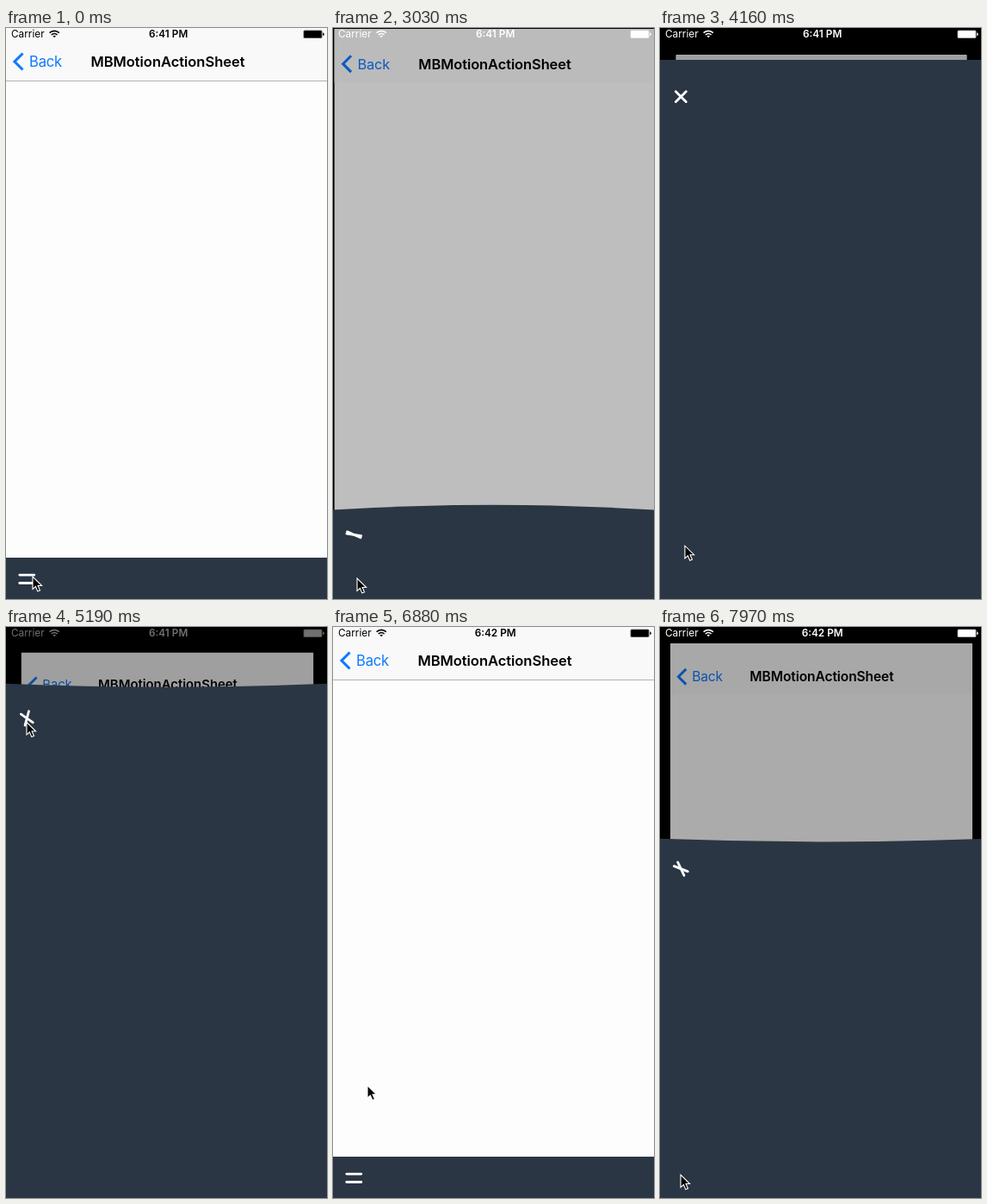
An HTML page for the animation above (8 s loop, 373 by 663 pixels).

```html
<!DOCTYPE html>
<html lang="en">
<head>
<meta charset="utf-8">
<title>Motion action sheet</title>
<style>
html, body { margin: 0; width: 100%; height: 100%; overflow: hidden; background: #000; }
svg { display: block; width: 373px; height: 663px; font-family: Inter, Roboto, sans-serif; }
.title { font-size: 16.6px; font-weight: 600; letter-spacing: -.08px; text-anchor: middle; }
.back { font-size: 16.6px; letter-spacing: -.2px; fill: #0f7aff; }
.chevron { fill: none; stroke: #0f7aff; stroke-width: 3.1; }
.status { font-size: 11.8px; }
.clock { font-weight: 600; text-anchor: middle; }
.icon { stroke: #fff; stroke-width: 2.8; stroke-linecap: round; }
</style>
</head>
<body>
<svg viewBox="0 0 373 663">
  <rect width="373" height="663"/>
  <g id="page">
    <rect y="-2" width="375" height="667" fill="#fdfdfd"/>
    <rect y="-2" width="375" height="63" fill="#f9f9f9"/>
    <rect id="hairline" y="61" width="375" height="1" fill="#b0b1b2"/>
    <path class="chevron" d="M19.5 29.5 10 39 19.5 48.5"/>
    <text class="back" x="27" y="45">Back</text>
    <text class="title" x="188" y="45">MBMotionActionSheet</text>
    <rect id="dim" y="-2" width="375" height="667"/>
  </g>
  <g id="status" class="status">
    <text x="6" y="11.3">Carrier</text>
    <text id="clock" class="clock" x="188.7" y="11.3">6:41 PM</text>
    <g id="wifi" fill="none" stroke-width="1.7">
      <path d="M50.6 5.6a8 8 0 0 1 11.2 0M52.8 8a5 5 0 0 1 6.8 0"/>
      <path d="M54.4 9.3 56.2 11.2 58 9.3Q56.2 8 54.4 9.3Z" stroke="none" fill="currentColor"/>
    </g>
    <rect x="345.5" y="2.5" width="22" height="9.5" rx="1.6" fill-opacity=".55"/>
    <rect x="346.3" y="3.3" width="20.4" height="8" rx=".8"/>
    <path d="M368.2 5.3q1.5 .4 1.5 2t-1.5 2z"/>
  </g>
  <path id="sheet" fill="#2b3644"/>
  <g id="icon" class="icon">
    <path id="barA" d="M-8.5 0H8.5"/>
    <path id="barB" d="M-8.5 0H8.5"/>
  </g>
  <path id="cursor" d="M0 0V14.6L3.4 11.5 5.8 17.1 8.5 16 6.1 10.5H10.6Z" fill="#000" stroke="#fff" stroke-width="1.1"/>
</svg>
<script>
const LOOP = 8000;
const GAP = 4.7;
const el = Object.fromEntries([...document.querySelectorAll('[id]')].map(n => [n.id, n]));
const put = (node, name, value) => node.setAttribute(name, value);

const linear = u => u;
const smooth = u => u * u * (3 - 2 * u);

// Value at time t along [time, value] keys
function track(t, keys, ease = smooth) {
  if (t <= keys[0][0]) return keys[0][1];
  for (let i = 1; i < keys.length; i++) {
    const [t0, a] = keys[i - 1], [t1, b] = keys[i];
    if (t < t1) return a + (b - a) * ease((t - t0) / (t1 - t0));
  }
  return keys[keys.length - 1][1];
}
const ramp = (t, t0, t1, a = 0, b = 1, ease = linear) => track(t, [[t0, a], [t1, b]], ease);

// Pose of the sheet, t ms after the menu button is pressed
function opening(t) {
  const lift = ramp(t, 346, 640, 0, 1, smooth);
  return {
    lift,
    scale: 1 - .1 * lift,
    bulge: track(t, [[0, -1], [220, -16], [600, 6], [720, -2], [870, 0]]),
    dim: ramp(t, 0, 590, 0, .37),
    ink: ramp(t, 100, 350, 0, 255),
    gap: ramp(t, 20, 310, GAP, 0, smooth),
    turn: ramp(t, 330, 730),
    line: t >= 540
  };
}

function closing(t) {
  return {
    lift: ramp(t, 135, 487, 1, 0, smooth),
    scale: track(t, [[140, .9], [500, 1.02], [800, 1]]),
    bulge: track(t, [[0, 0], [180, 4], [460, -21], [640, 4], [800, 0]]),
    dim: ramp(t, 175, 615, .37, 0),
    ink: ramp(t, 80, 260, 255, 0),
    gap: ramp(t, 470, 760, 0, GAP, smooth),
    turn: ramp(t, 110, 430, 1, 0),
    line: t < 250 || t >= 760
  };
}

const rest = { lift: 0, scale: 1, bulge: 0, dim: 0, ink: 0, gap: GAP, turn: 0, line: true };

function pose(t) {
  if (t >= 7450) return opening(t - 7450);
  if (t >= 5010) return closing(t - 5010);
  return t >= 2630 ? opening(t - 2630) : rest;
}

function pointer(t) {
  if (t < 4040) return [ramp(t, 450, 540, 31, 28), ramp(t, 450, 540, 637, 639)];
  if (t < 6350) {
    const y = ramp(t, 4040, 4780, 639, 110.5, smooth);
    return [track(-y, [[-639, 28], [-340, 49], [-240, 40], [-185, 11], [-110.5, 24]]), y];
  }
  const y = ramp(t, 6350, 7080, 110.5, 626.5, smooth) + ramp(t, 7130, 7220, 0, 9.5);
  return [track(y, [[110, 24], [400, 46], [532, 40], [626, 24]]), y];
}

function draw(t) {
  const p = pose(t);
  put(el.page, 'transform', `translate(187.5 331.5) scale(${p.scale}) translate(-187.5 -331.5)`);
  put(el.dim, 'opacity', p.dim);
  put(el.hairline, 'opacity', p.line ? 1 : 0);

  const ink = `rgb(${[p.ink, p.ink, p.ink].map(Math.round)})`;
  put(el.status, 'fill', ink);
  put(el.status, 'color', ink);
  put(el.wifi, 'stroke', ink);
  el.clock.textContent = t < 6500 ? '6:41 PM' : '6:42 PM';

  const edge = 615 - 578 * p.lift + .4 * p.bulge;
  put(el.sheet, 'd', `M0 ${edge}Q187.5 ${edge + 2 * p.bulge} 375 ${edge}V665H0Z`);

  put(el.icon, 'transform', `translate(24.3 ${639.8 - 560 * p.lift})`);
  put(el.barA, 'transform', `translate(0 ${-p.gap}) rotate(${45 * p.turn})`);
  put(el.barB, 'transform', `translate(0 ${p.gap}) rotate(${135 * p.turn})`);
  put(el.cursor, 'transform', `translate(${pointer(t)})`);
}

const start = performance.now();
function frame() {
  draw((performance.now() - start) % LOOP);
  requestAnimationFrame(frame);
}
frame();
</script>
</body>
</html>
```
